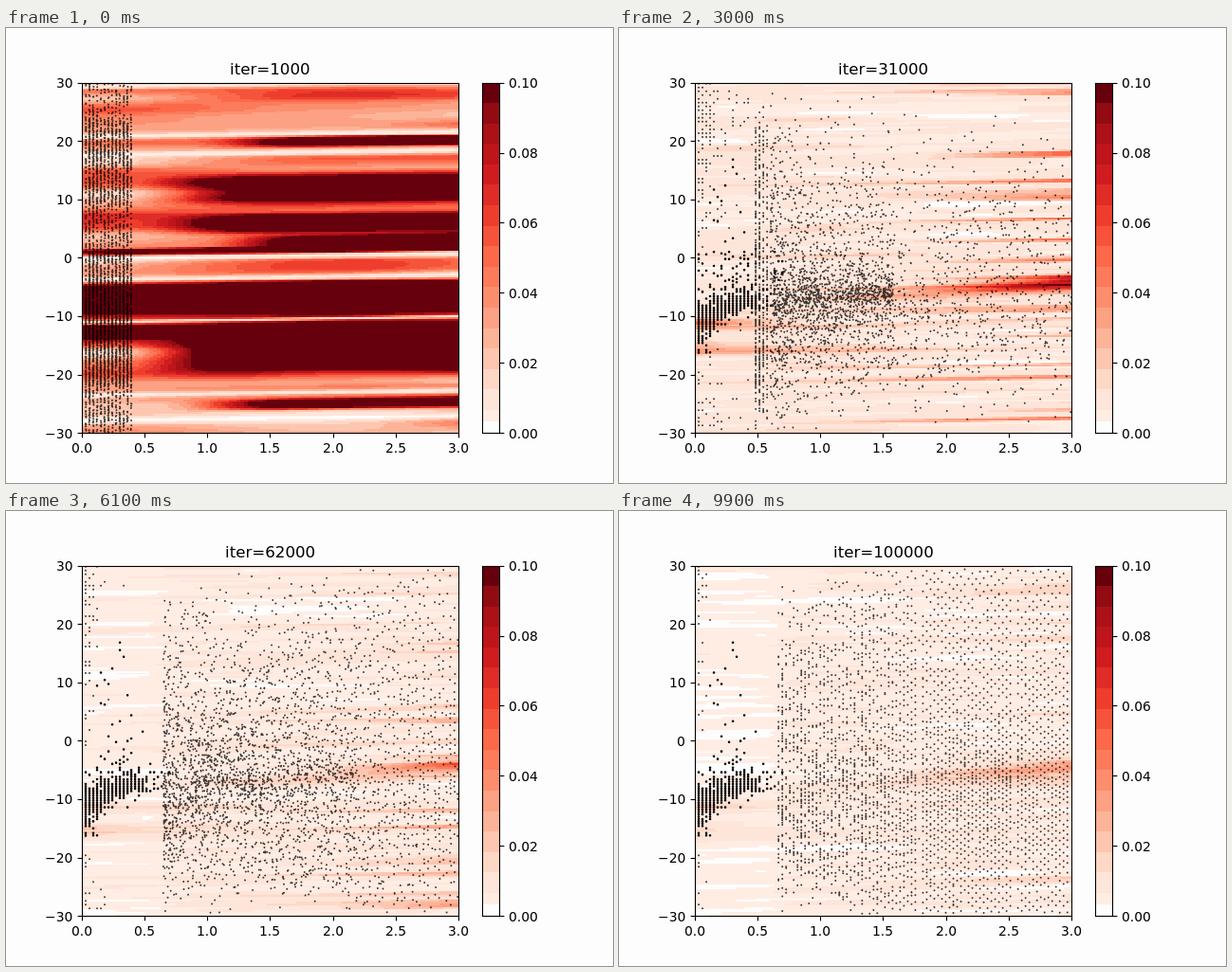
Write an HTML page with a canvas that moves like this. It is 640x480 px and loops after 10 s.

```html
<!DOCTYPE html>
<html lang="en">
<head>
<meta charset="utf-8">
<title>Training field</title>
<style>
html, body { margin: 0; width: 100%; height: 100%; overflow: hidden; background: #fefdfd; }
canvas { display: block; width: 640px; height: 480px; }
</style>
</head>
<body>
<canvas id="stage" width="640" height="480"></canvas>
<script>
const ctx = document.getElementById('stage').getContext('2d');
const L = 80, R = 476.8, T = 57.6, B = 427.2, COLS = 100, ROWS = 200, STEP = .0303;
const FONT = '"DejaVu Sans", Verdana, sans-serif';
const px = x => L + x * (R - L) / 3;
const py = y => (T + B) / 2 - y * (B - T) / 60;
const mix = (a, b, f) => a + (b - a) * f;
const clamp = v => Math.max(0, Math.min(1, v));
const smooth = v => { v = clamp(v); return v * v * (3 - 2 * v); };
const decay = (k, span) => Math.exp(-k / span);
const bump = d => Math.exp(-d * d);

function hash(a, b = 0, c = 0) {
  let h = Math.imul(a + 101, 374761393) ^ Math.imul(b + 57, 668265263) ^ Math.imul(c + 13, 1274126177);
  h = Math.imul(h ^ (h >>> 15), 2246822519);
  h = Math.imul(h ^ (h >>> 13), 3266489917);
  return ((h ^ (h >>> 16)) >>> 0) / 4294967296;
}

function noise(x, y, z) {
  const i = Math.floor(x), j = Math.floor(y), n = Math.floor(z);
  const u = smooth(x - i), v = smooth(y - j);
  const plane = c => mix(mix(hash(i, j, c), hash(i + 1, j, c), u),
    mix(hash(i, j + 1, c), hash(i + 1, j + 1, c), u), v);
  return mix(plane(n), plane(n + 1), z - n);
}

// Colour bands; values are in hundredths
const edge = i => i < 3 ? i * .33 : .66 + (i - 2) * 9.34 / 16;
const REDS = ['fff5f0', 'fee0d2', 'fcbba1', 'fc9272', 'fb6a4a', 'ef3b2c', 'cb181d', 'a50f15', '67000d']
  .map(s => [0, 2, 4].map(i => parseInt(s.slice(i, i + 2), 16)));
const BANDS = Array.from({ length: 18 }, (_, i) => {
  if (!i) return [254, 253, 253];
  if (i === 17) return REDS[8];
  const f = (edge(i) + edge(i + 1)) / 20 * 8, n = Math.floor(f);
  return REDS[n].map((c, j) => Math.round(mix(c, REDS[n + 1][j], f - n)));
});
const bandOf = v => BANDS[v < .66 ? +(v >= .33) : Math.min(17, 2 + Math.floor((v - .66) / 9.34 * 16))];

// Early field: dark bands as y, half height, x where they set in; light lines as y
const DARK = [[19.4, .9, .9], [11.5, 2.4, .3], [5.5, 1.6, .4], [2, 1.4, .9], [.8, .6, -.8],
  [-7.4, 3, -1.5], [-12.8, 1.3, -1.5], [-17, 3.6, .2], [-25.6, .9, .6]];
const LIGHT = [29.4, 20.8, 17.6, -.1, -3.8, -11, -23.6, -28];

function earlyField(x, y) {
  const q = y - x * .3;
  let v = 1 + 6 * noise(x * .5, q * .55, 7);
  for (const [mid, half, start] of DARK)
    v += 10 * smooth((x - start) / 1.2) * Math.exp(-(((q - mid) / half) ** 4));
  for (const mid of LIGHT) v *= 1 - .9 * bump((q - mid) / (mid === -11 ? .22 : .6));
  return v;
}

function lateField(x, y, k) {
  const q = y - x * .35, young = decay(k, 40), right = x / 3;
  const fine = noise(x * .9, q * 2.4, k / 3), broad = noise(x * .6, q * .8, k / 5 + 50);
  let v = .47 + .5 * young + (.7 + young) * (fine * .55 + broad * .45 - .5) * (1 + right * .5);
  v -= .15 * smooth((k - 25) / 25) * smooth((.8 - x) / .3);
  // Random streaks growing to the right
  const ridge = Math.max(0, noise(x * .3, q * 1.4, k / 6 + 90) - .6);
  v += ridge * (4 + 16 * young) * (.1 + right ** 1.5);
  // The main front and two streaks fading from the left
  const power = .8 + 1.6 * smooth(k / 45);
  const front = (3 + 13 * decay(k, 28)) * right ** power;
  v += front * bump((y + 8.7 - 1.45 * x) / 1.3) * (.65 + .6 * fine);
  const leftPart = decay(x, .9) * (1.6 + 3 * young) * (.4 + fine);
  return v + leftPart * (bump((y + 11.4) / .9) + bump((y + 15.6) / 1.2) * .8);
}

const grid = document.createElement('canvas');
grid.width = COLS;
grid.height = ROWS;
const gridCtx = grid.getContext('2d');
const pixels = gridCtx.createImageData(COLS, ROWS);

function drawField(k) {
  const fade = Math.pow(clamp(k / 17), .6);
  for (let r = 0; r < ROWS; r++) for (let c = 0; c < COLS; c++) {
    const x = (c + .5) * 3 / COLS, y = 30 - (r + .5) * 60 / ROWS;
    let v = fade > 0 ? lateField(x, y, k) : 0;
    if (fade < 1) v = mix(Math.min(13, earlyField(x, y)), v, fade);
    pixels.data.set([...bandOf(v), 255], (r * COLS + c) * 4);
  }
  gridCtx.putImageData(pixels, 0, 0);
  ctx.imageSmoothingEnabled = false;
  ctx.drawImage(grid, 80, 58, 397, 369);
}

function dot(x, y, r) {
  ctx.moveTo(x + r, y);
  ctx.arc(x, y, r, 0, 7);
}

function drawSwarm(k) {
  const p = k / 99, rows = 42;
  const lo = .03 + .62 * smooth(k / 45), hi = .4 + 2.6 * smooth(k / 10), mid = 1.9 - 1.7 * decay(k, 40);
  const bend = Math.log2((hi - lo) / (mid - lo));
  const drawn = .42 * decay(k, 75) * smooth(k / 8);
  ctx.beginPath();
  for (let c = 0; c < 78; c++) for (let r = 0; r < 75; r++) {
    if (r >= rows && k > hash(c, r, 5) * 9) continue;
    const u = clamp((c + .5 + (hash(c, r, 1) - .5) * 2 * (1 - p)) / 78);
    const near = hash(c, r, 6) < drawn;
    let x = near ? mid + (u - .5) * (.6 + 1.2 * p) : lo + (hi - lo) * u ** bend;
    const snap = k < 5 ? .75 : x < .6 ? 1 : Math.max(p ** 4, p * smooth((x - 2) / .8));
    const col = Math.max(1, Math.round(x / STEP));
    x = mix(x, col * STEP, snap);

    // Rows are loose at first and settle into a lattice from the right
    const loose = (.08 + .92 * clamp(1 - p * x * .5)) ** 3 + .008;
    const even = (r % rows + .25 + (col % 2) * .5) / rows;
    const v = mix(even, hash(c, r, 2), loose) * 2 - 1;
    const pull = near ? 4 : k < 6 ? .01 : .4 + .35 * x;
    const g = Math.sinh(pull * Math.abs(v)) / Math.sinh(pull);
    const front = -7.8 + x * 1.1;
    let y = v < 0 ? front - (front + 30) * g : front + (30 - front) * g;
    y += (noise(c * 7 + r * 91, 0, k / 8) - .5) * .8 * loose;
    if (k < 6 && hash(c, r, 3) > (y > 24 || y < -22 ? .3 : y > 1 && y < 9 ? .5 : 1)) continue;
    dot(px(x), py(y), 1);
  }

  // Regular columns that linger along the left edge
  if (k > 4) for (let j = 1; j < 17; j++) for (let n = 0; n < 92; n++) {
    const y = 29.8 - n * .65;
    const zone = .06 + .9 * smooth(Math.abs(y + 8) / 40);
    const shown = decay(j - 1, 1 + 14 * decay(k, 22)) * zone * mix(1, .6, p);
    if (hash(j, n, 8) < shown) dot(px(j * STEP), py(y), 1);
  }
  ctx.fillStyle = 'rgba(0,0,0,.76)';
  ctx.fill();
}

// Lasting bold dots: a curved clump and a few strays above it
function drawCore(k) {
  if (k < 2) return;
  ctx.beginPath();
  const show = (j, y, h) => { if (k > 2 + h * 10) dot(px(j * STEP), py(y), 1.3); };
  for (let j = 1; j <= 23; j++) {
    const x = j * STEP, mid = -6 - 6 * decay(x, .28), half = .8 + 4 * decay(x, .3);
    for (let n = 0; n < 62; n++) {
      const y = 1 - n * .4, h = hash(j, n, 21);
      const keep = 1.15 * bump((y - mid) / half) * (1 - .8 * smooth((x - .42) / .22));
      const brief = y > mid && k < 17 + hash(j, n, 23) * 25 ? .2 : 0;
      if (h < Math.max(keep, brief)) show(j, y, hash(j, n, 22));
    }
  }
  for (let i = 0; i < 32; i++) {
    const lift = hash(i, 31) ** 2;
    const j = Math.round(10 + (hash(i, 32) - .5) * 8 - lift * 4 + (1 - lift) * (hash(i, 33) - .3) * 8);
    show(j, -4 + 22 * lift, hash(i, 34));
  }
  ctx.fillStyle = '#000';
  ctx.fill();
}

function line(x1, y1, x2, y2) {
  ctx.beginPath();
  ctx.moveTo(x1, y1);
  ctx.lineTo(x2, y2);
  ctx.stroke();
}

// Text starts on whole pixels; anchor is 0 left, .5 centre, 1 right
function text(s, x, y, anchor, size = 13.89) {
  ctx.font = size + 'px ' + FONT;
  ctx.fillText(s, Math.round(x - ctx.measureText(s).width * anchor), Math.round(y));
}

function drawAxes(k) {
  ctx.strokeStyle = ctx.fillStyle = '#000';
  ctx.lineWidth = 1.11;
  ctx.strokeRect(80.5, 58.5, 397, 369);
  for (let i = 0; i <= 6; i++) {
    const x = Math.round(px(i / 2)) + .5, v = 30 - i * 10, y = Math.round(py(v)) + .5;
    line(x, 427.5, x, 432.4);
    text((i / 2).toFixed(1), px(i / 2), 448, .5);
    line(75.6, y, 80.5, y);
    text(String(v).replace('-', '\u2212'), 70.3, py(v) + 5.3, 1);
  }
  text('iter=' + (k + 1) * 1000, 278.4, 49, .5, 16.67);
}

function drawBar() {
  const at = v => B - v * (B - T) / 10;
  BANDS.forEach((c, i) => {
    const y = Math.round(at(edge(i + 1))), end = Math.round(at(edge(i)));
    ctx.fillStyle = `rgb(${c})`;
    ctx.fillRect(502, y, 18, end - y);
  });
  ctx.fillStyle = '#000';
  ctx.strokeRect(502.5, 58.5, 18, 369);
  for (let i = 0; i <= 5; i++) {
    const y = Math.round(at(i * 2)) + .5;
    line(520.5, y, 525.4, y);
    text((i / 50).toFixed(2), 530, at(i * 2) + 5.3, 0);
  }
}

function draw(k) {
  ctx.fillStyle = '#fefdfd';
  ctx.fillRect(0, 0, 640, 480);
  ctx.save();
  ctx.beginPath();
  ctx.rect(80, 58, 397, 369);
  ctx.clip();
  drawField(k);
  drawSwarm(k);
  drawCore(k);
  ctx.restore();
  drawAxes(k);
  drawBar();
}

let last = -1;
function tick() {
  const k = Math.floor(performance.now() % 10000 / 100);
  if (k !== last) draw(last = k);
  requestAnimationFrame(tick);
}
tick();
</script>
</body>
</html>
```
